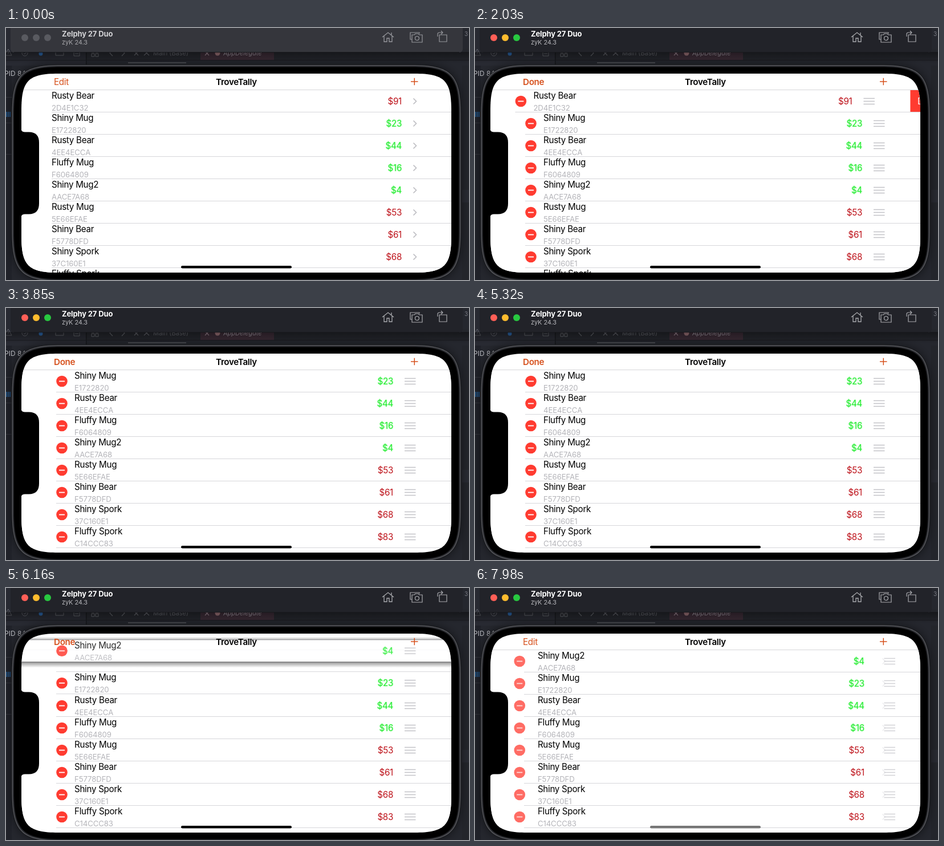
Write an HTML page with a canvas that moves like this. It is 812 px wide and 442 px high and loops after 8 s.

```html
<!DOCTYPE html>
<html lang="en">
<head>
<meta charset="utf-8">
<title>Item list editing</title>
<style>
html, body { margin: 0; width: 100%; height: 100%; overflow: hidden; background: #23252c; }
canvas { display: block; width: 812px; height: 442px; }
</style>
</head>
<body>
<canvas id="stage"></canvas>
<script>
const W = 812, H = 442, LOOP = 8000, STEP = 70;
const LEFT = 27, RIGHT = 781, TOP = 80, BOTTOM = 429, FIRST = 109, ROW = 39;
const FONT = 'Inter, "Liberation Sans", sans-serif';
const RED = '#ff3b30', ORANGE = '#d6501c', LINE = '#d6d6da', GREY = '#c3c3c8';

const items = [
  ['Rusty Bear', '2D4E1C32', 91],
  ['Shiny Mug', 'E1722820', 23],
  ['Rusty Bear', '4EE4ECCA', 44],
  ['Fluffy Mug', 'F6064809', 16],
  ['Shiny Mug2', 'AACE7A68', 4],
  ['Rusty Mug', '5E66EFAE', 53],
  ['Shiny Bear', 'F5778DFD', 61],
  ['Shiny Spork', '37C160E1', 68],
  ['Fluffy Spork', 'C14CCC83', 83]
];
const DRAGGED = 4;

const canvas = document.getElementById('stage');
const ctx = canvas.getContext('2d');
const dpr = window.devicePixelRatio || 1;
canvas.width = W * dpr;
canvas.height = H * dpr;

// Timing helpers
const clamp = v => Math.max(0, Math.min(1, v));
const lerp = (a, b, p) => a + (b - a) * p;
const span = (t, start, length) => clamp((t - start) / length);
const easeOut = u => 1 - (1 - u) * (1 - u);
const easeInOut = u => u < .5 ? 2 * u * u : 1 - 2 * (1 - u) * (1 - u);
const ease = (t, start, length) => easeInOut(span(t, start, length));
const spring = (t, start, w) => {
  const x = Math.max(0, t - start) / 1000 * w;
  return 1 - (1 + x) * Math.exp(-x);
};

// Drawing helpers
function rect(x, y, w, h, color) {
  ctx.fillStyle = color;
  ctx.fillRect(x, y, w, h);
}

function round(x, y, w, h, r, color) {
  ctx.fillStyle = color;
  ctx.beginPath();
  ctx.roundRect(x, y, w, h, r);
  ctx.fill();
}

// Rectangle whose corners blend gradually into the sides
function smoothRect(x, y, w, h, r) {
  const e = 1.5 * r, c = .281 * r, x2 = x + w, y2 = y + h;
  return new Path2D(`M${x} ${y + e}C${x} ${y + c} ${x + c} ${y} ${x + e} ${y}` +
    `H${x2 - e}C${x2 - c} ${y} ${x2} ${y + c} ${x2} ${y + e}` +
    `V${y2 - e}C${x2} ${y2 - c} ${x2 - c} ${y2} ${x2 - e} ${y2}` +
    `H${x + e}C${x + c} ${y2} ${x} ${y2 - c} ${x} ${y2 - e}Z`);
}

function disc(x, y, r, color) {
  ctx.fillStyle = color;
  ctx.beginPath();
  ctx.arc(x, y, r, 0, 7);
  ctx.fill();
}

function stroke(path, color, width) {
  ctx.strokeStyle = color;
  ctx.lineWidth = width;
  ctx.stroke(new Path2D(path));
}

function text(str, x, y, size, color, { weight = 400, align = 'left', track = -.3, style = '' } = {}) {
  ctx.font = `${style} ${weight} ${size}px ${FONT}`;
  ctx.letterSpacing = track + 'px';
  ctx.textAlign = align;
  ctx.fillStyle = color;
  ctx.fillText(str, x, y);
}

function faded(alpha, draw) {
  if (alpha <= 0) return;
  ctx.save();
  ctx.globalAlpha *= alpha;
  draw();
  ctx.restore();
}

// Shadow fading from y over h pixels, upwards if h is negative
function shade(x, w, y, h, alpha) {
  const g = ctx.createLinearGradient(0, y, 0, y + h);
  g.addColorStop(0, `rgba(0,0,0,${alpha})`);
  g.addColorStop(1, 'rgba(0,0,0,0)');
  rect(x, Math.min(y, y + h), w, Math.abs(h), g);
}

// Editor window behind the device
function drawEditor() {
  rect(0, 0, W, H, '#25272e');
  rect(0, 0, 140, 66, '#282a32');
  rect(140, 36, 672, 21, '#24262c');
  rect(341, 36, 129, 21, '#3c2c37');
  rect(140, 0, 1.5, 66, '#17181c');
  rect(0, 56, W, 1, '#1b1c21');
  rect(214, 60, 102, 2, '#4d4f55');

  const dim = '#62646b';
  stroke('M-3 48L4 37L10 48Z M4 41V45', dim, 1);
  stroke('M28 44A5 5 0 1 0 38 44A5 5 0 1 0 28 44M31 44L33 46L36 42', dim, 1);
  disc(61, 45, 3.5, '#2c66a8');
  stroke('M87 40H92L94 42H101V48H87Z M119 38H129V49H119Z M121 45H127', dim, 1);
  stroke('M150 38H155V43H150Z M157 38H162V43H157Z M150 45H155V50H150Z M157 45H162V50H157Z', dim, 1);
  stroke('M187 39L182 44L187 49 M203 39L208 44L203 49', dim, 1.1);
  stroke('M225 41L232 48M232 41L225 48 M242 48L251 40M242 40L251 48', dim, 1.2);
  text('Main (Base)', 258, 48, 11, dim, { track: 0 });
  stroke('M349 41L356 48M356 41L349 48', '#98838f', 1.2);
  disc(371, 44, 4.5, '#9b7277');
  text('AppDelegate', 381, 48, 11, '#98909a', { track: 0, style: 'italic' });

  rect(0, 66, 10, H, '#202229');
  for (const y of [121, 166, 221]) rect(0, y, 11, 1, '#34363d');
  text('PID 84', -3, 83.5, 12, '#b9bac0', { track: 0 });
  stroke('M1 147V156M4 147V156M7 147V156', '#23629f', 1.5);
  rect(800, 66, 12, H, '#23252b');
  rect(800, 284, 12, 22, '#292b32');
  text('3', 804, 14, 10, '#777981');
}

function drawTitleBar(active) {
  shade(0, W, 42, 20, .4);
  round(8, -10, 793, 53, 6, active ? '#222329' : '#35363c');
  rect(14, 42, 781, 1, '#18191d');
  const lights = active ? ['#ff5f57', '#febc2e', '#28c840'] : ['#595a60', '#595a60', '#595a60'];
  lights.forEach((c, i) => disc(33 + 20 * i, 17, 6, c));
  text('Zelphy 27 Duo', 98, 15, 13, active ? '#ffffff' : '#d3d3d6', { weight: 700, track: -.15 });
  text('zyK 24.3', 98, 29, 11, active ? '#b7b7bb' : '#a6a6aa', { track: -.1 });

  const c = active ? '#a9aaae' : '#96979c';
  stroke('M660 16L670 8L680 16M663 14V24H668V18H672V24H677V14M676 8V12', c, 1.3);
  stroke('M712 20H709V8H725V10M712 12H716L718 10H723L725 12H730V25H712Z', c, 1.2);
  stroke('M717.5 18A3.5 3.5 0 1 0 724.5 18A3.5 3.5 0 1 0 717.5 18', c, 1.2);
  stroke('M760 12H773V24H760ZM757 15V11Q757 8 760 8H765M763 5L766 8L763 11', c, 1.2);
}

function drawDevice() {
  const rings = [[0, '#17181b'], [1, '#56575c'], [2.5, '#242529'], [4.5, '#000']];
  ctx.save();
  ctx.shadowColor = 'rgba(0,0,0,.5)';
  ctx.shadowBlur = 16 * dpr;
  for (const [inset, color] of rings) {
    ctx.fillStyle = color;
    ctx.fill(smoothRect(9.5 + inset, 64 + inset, 789 - 2 * inset, 381 - 2 * inset, 59 - inset));
    ctx.shadowColor = 'transparent';
  }
  ctx.restore();
}

function drawNotch() {
  ctx.fillStyle = '#000';
  ctx.fill(new Path2D('M26 176Q27 182.5 33 182.5H40Q58 182.5 58 201V308' +
    'Q58 326.5 40 326.5H33Q27 326.5 26 333Z'));
}

// One list row; edit goes from 0 (plain) to 1 (editing)
function drawRow([name, serial, price], y, edit, dx = 0) {
  const mid = y + 19.5, x = lerp(80, 120, edit) + dx;
  text(name, x, y + 15, 15.2, '#000');
  text(serial, x, y + 36, 13.2, '#b4b4b9', { track: -.1 });

  ctx.save();
  if (price < 50) {
    ctx.shadowColor = 'rgba(50,255,60,.6)';
    ctx.shadowBlur = 2 * dpr;
  }
  text('$' + price, lerp(694, 679, edit) + dx, mid + 5.5, 15.2,
    price < 50 ? '#2bea38' : '#bd1119', { align: 'right' });
  ctx.restore();

  faded(1 - edit, () => stroke(`M714.5 ${mid - 5}L719.5 ${mid}L714.5 ${mid + 5}`, '#bcbcc1', 1.6));
  faded(edit, () => {
    const cx = lerp(20, 98, edit) + dx, hx = lerp(772, 699, edit) + dx;
    disc(cx, mid, 9.8, RED);
    rect(cx - 5, mid - .9, 10, 1.8, '#fff');
    for (const off of [-5, 0, 5]) rect(hx, mid + off - .75, 19.5, 1.5, GREY);
  });
}

function separator(y, edit, dx = 0) {
  const x = lerp(80, 88, edit) + dx;
  rect(x, y - 1, RIGHT - x, 1, LINE);
}

function drawLifted(y, lift) {
  const width = RIGHT - LEFT;
  faded(lift, () => {
    shade(LEFT, width, y, -5, .28);
    shade(LEFT, width, y + ROW, 10, .42);
  });
  faded(lerp(1, .84, lift), () => {
    rect(LEFT, y, width, ROW, '#fff');
    drawRow(items[DRAGGED], y, 1);
  });
  faded(lift, () => {
    rect(LEFT, y - .5, width, 1, '#8d8d90');
    rect(LEFT, y + ROW - .5, width, 1.2, '#707072');
  });
}

function drawList(t, edit) {
  const removed = ease(t, 3005, 300);
  const starts = { 1: 5890, 2: 5730, 3: 5679 };
  const lift = span(t, 5530, 140) * (1 - ease(t, 6400, 300));
  const dragging = t >= 5600 && t < 6720;

  if (removed < 1) {
    const width = 108 * spring(t, 1980, 14.4) + 646 * removed;
    drawRow(items[0], FIRST, edit, -width);
    separator(FIRST + ROW, edit, -width);
    if (width > .1) {
      rect(RIGHT - width, FIRST, width, ROW, RED);
      text('Delete', RIGHT - width + 12.5, FIRST + 24.5, 15.2, '#fff');
    }
  }

  items.forEach((item, i) => {
    if (!i || (i === DRAGGED && dragging)) return;
    let y = FIRST + ROW * (i - removed);
    if (starts[i]) y += ROW * ease(t, starts[i], 300);
    if (i === DRAGGED && t >= 6720) y = FIRST;
    rect(LEFT, y, RIGHT - LEFT, ROW, '#fff');
    if (i === 1 && y > FIRST) separator(y, edit);
    drawRow(item, y, edit);
    separator(y + ROW, edit);
  });

  rect(LEFT, FIRST - 1, RIGHT - LEFT, 1, LINE);
  if (dragging) {
    const path = lerp(226, 88, easeOut(span(t, 5542, 720)));
    drawLifted(lerp(path, FIRST, ease(t, 6400, 300)), lift);
  }
}

function drawNav(editing) {
  text(editing ? 'Done' : 'Edit', 84, 99.5, 15.2, ORANGE, { weight: editing ? 600 : 400 });
  text('TroveTally', 404, 99.5, 15.2, '#000', { weight: 600, align: 'center' });
  stroke('M710 94H722.5M716.3 87.8V100.2', ORANGE, 1.5);
}

function render(t) {
  const edit = ease(t, 890, 450) - ease(t, 7820, 450);
  const tone = Math.round(118 * span(t, 6400, 500));
  ctx.setTransform(dpr, 0, 0, dpr, 0, 0);
  drawEditor();
  drawTitleBar(t >= 910);
  drawDevice();

  ctx.save();
  ctx.clip(smoothRect(LEFT, TOP, RIGHT - LEFT, BOTTOM - TOP, 43));
  rect(LEFT, TOP, RIGHT - LEFT, BOTTOM - TOP, '#fff');
  drawList(t, edit);
  drawNav(t >= 910 && t < 7840);
  drawNotch();
  round(307, 417, 194, 4.6, 2.3, `rgb(${tone},${tone},${tone})`);
  ctx.restore();
}

const began = performance.now();
function tick() {
  const t = (performance.now() - began) % LOOP;
  render(Math.floor(t / STEP) * STEP);
  requestAnimationFrame(tick);
}
tick();
</script>
</body>
</html>
```
